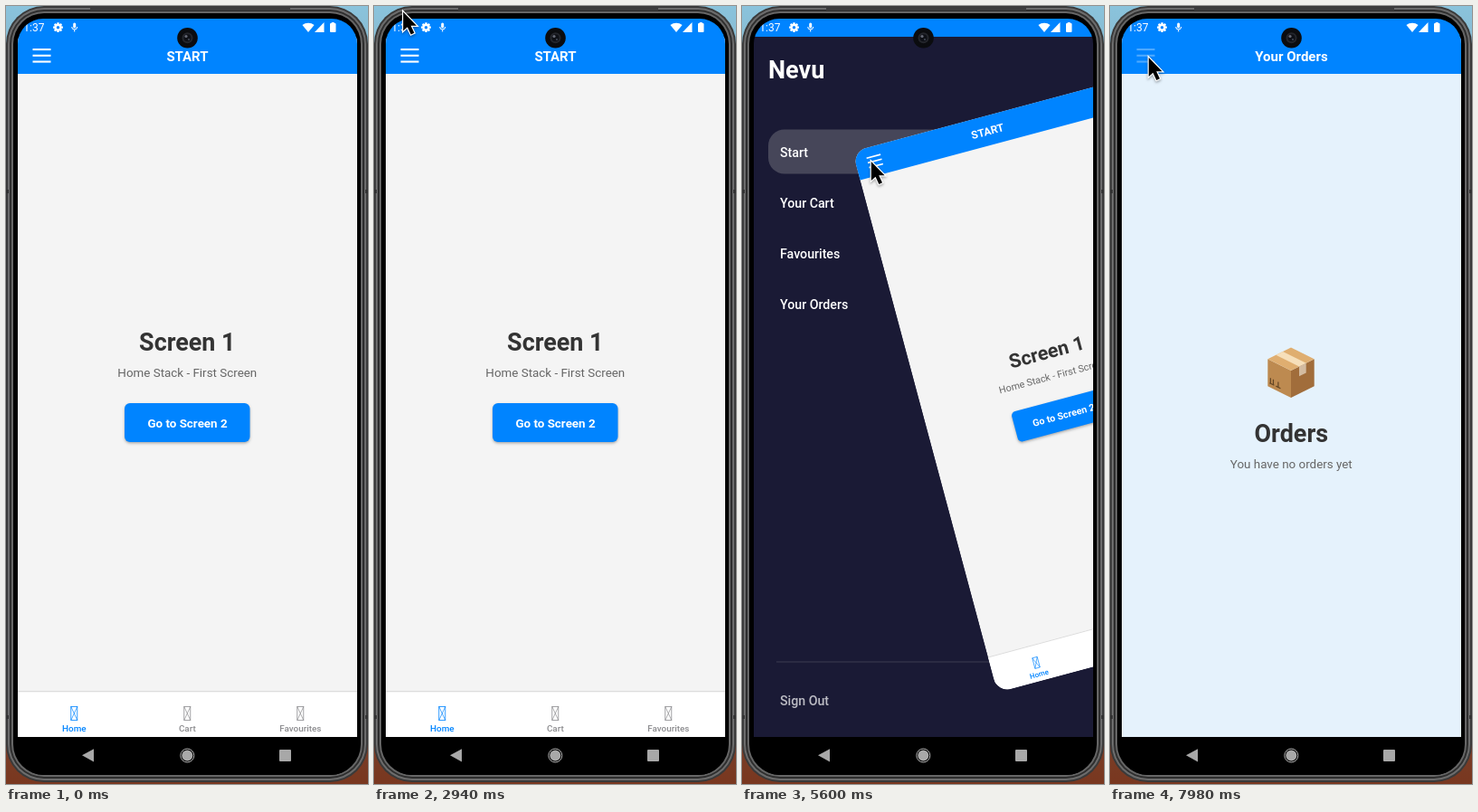
These frames come from a looping animation (400 by 860 pixels, 8 s). An HTML page with a canvas:

```html
<!DOCTYPE html>
<html lang="en">
<head>
<meta charset="utf-8">
<title>Drawer navigation</title>
<style>
html, body { margin: 0; width: 100%; height: 100%; overflow: hidden; background: #000; }
canvas { display: block; }
</style>
</head>
<body>
<canvas id="stage" width="400" height="860"></canvas>
<script>
const ctx = document.getElementById('stage').getContext('2d');
const LOOP = 8000, STEP = 70, TURN = Math.PI * 2;
const BLUE = '#0084ff', NAVY = '#1a1a35', INK = '#333', GREY = '#a8a8a8';
const LEFT = 13, TOP = 34, WIDTH = 375, HEIGHT = 774;
const CX = LEFT + WIDTH / 2, CY = TOP + HEIGHT / 2;
const MENU = ['Start', 'Your Cart', 'Favourites', 'Your Orders'];
const TABS = ['Home', 'Cart', 'Favourites'];

// the pointer circles once, then eases between a few stops: time, x, y
const CIRCLE = { start: 1260, period: 653, x: 193, y: 592, rx: 88, ry: 136 };
const STOPS = [
  [420, 184, 846], [980, 268, 400], [1260, 193, 456], [1913, 193, 456], [2310, 179, 465],
  [2870, 32, 4], [3290, 22, 30], [3430, 4, 44], [3780, 40, 58], [4480, 42, 60],
  [4900, 162, 192], [5250, 142, 171], [5600, 142, 171], [5670, 332, 21], [5810, 324, 29],
  [6440, 67, 328], [7000, 69, 329], [7420, 50, 88], [7840, 42, 56]
];

function rounded(x, y, w, h, r, fill) {
  ctx.beginPath();
  ctx.roundRect(x, y, w, h, r);
  if (fill) { ctx.fillStyle = fill; ctx.fill(); }
}

function rect(x, y, w, h, fill) {
  ctx.fillStyle = fill;
  ctx.fillRect(x, y, w, h);
}

function disc(x, y, r, fill) {
  ctx.beginPath();
  ctx.arc(x, y, r, 0, TURN);
  ctx.fillStyle = fill;
  ctx.fill();
}

function ring(x, y, r, color, end = TURN) {
  ctx.beginPath();
  ctx.arc(x, y, r, 0, end);
  ctx.strokeStyle = color;
  ctx.lineWidth = 1;
  ctx.stroke();
}

function poly(fill, ...points) {
  ctx.beginPath();
  points.forEach(([x, y]) => ctx.lineTo(x, y));
  ctx.fillStyle = fill;
  ctx.fill();
}

function line(color, width, x1, y1, x2, y2) {
  ctx.strokeStyle = color;
  ctx.lineWidth = width;
  ctx.beginPath();
  ctx.moveTo(x1, y1);
  ctx.lineTo(x2, y2);
  ctx.stroke();
}

// y is the middle of the capital letters
function text(str, x, y, size, weight, color, align = 'center') {
  ctx.font = `${weight} ${size}px Roboto, sans-serif`;
  ctx.textAlign = align;
  ctx.fillStyle = color;
  ctx.fillText(str, x, y + size * 0.355);
}

function shadow(blur, alpha) {
  ctx.shadowColor = `rgba(0,0,0,${alpha})`;
  ctx.shadowBlur = blur;
  ctx.shadowOffsetY = 1.5;
}

function ease(t, start, duration) {
  const k = Math.min(1, Math.max(0, (t - start) / duration));
  return k < 0.5 ? 2 * k * k : 1 - 2 * (1 - k) ** 2;
}

function drawFrame() {
  const wall = ctx.createLinearGradient(0, 0, 0, 860);
  wall.addColorStop(0, '#8ac3dc');
  wall.addColorStop(0.5, '#777');
  wall.addColorStop(1, '#79371f');
  rect(0, 0, 400, 860, wall);
  ['#3a3a3a', '#6c6c6c', '#2e2e2e', '#666', '#000'].forEach((color, i) => {
    const inset = i * 2;
    rounded(inset, inset, 400 - inset * 2, 858 - inset * 2, 42 - inset, color);
  });
  rect(93, 1, 221, 4, '#3c3c3c');
  for (const x of [0, 397]) for (const y of [203, 784]) rect(x, y, 3, 4, '#333');
}

function drawStatus() {
  rect(LEFT, 14, WIDTH, 20, BLUE);
  text('1:37', 42.5, 24, 12, 400, '#fff', 'right');

  for (let i = 0; i < 8; i++) {
    const a = i * TURN / 8;
    line('#fff', 2.3, 57.5, 23.7, 57.5 + 5.4 * Math.cos(a), 23.7 + 5.4 * Math.sin(a));
  }
  disc(57.5, 23.7, 4.1, '#fff');
  disc(57.5, 23.7, 1.7, BLUE);

  rounded(74.2, 18.5, 3, 6, 1.5, '#fff');
  ring(75.7, 23, 3, '#fff', TURN / 2);
  line('#fff', 1, 75.7, 26, 75.7, 28.5);

  ctx.beginPath();
  ctx.moveTo(334, 29);
  ctx.arc(334, 29, 10.3, TURN * 0.64, TURN * 0.86);
  ctx.fillStyle = '#fff';
  ctx.fill();
  poly('#fff', [341, 29], [351.5, 29], [351.5, 18]);
  rounded(358, 19, 6.5, 10, 1, '#fff');
  rect(359.7, 18, 3, 2, '#fff');
}

function drawMenu(active) {
  rect(LEFT, TOP, WIDTH, HEIGHT, NAVY);
  text('Nevu', 29, 70, 27, 700, '#fff', 'left');
  rounded(29, 136.5 + active * 56, 216, 49, 18, '#464659');
  MENU.forEach((label, i) => text(label, 42, 161.7 + i * 56, 14.2, 500, '#fff', 'left'));
  rect(38, 724.5, 262, 1, '#3c3c53');
  text('Sign Out', 42, 768, 14.2, 500, '#bcbcc4', 'left');
}

function drawPage(background, title, pressed) {
  rect(LEFT, TOP, WIDTH, HEIGHT, background);
  rect(LEFT, TOP, WIDTH, 41, BLUE);
  text(title, CX, 55.3, 15, 700, '#fff');
  const bars = pressed ? 'rgba(255,255,255,.3)' : '#fff';
  for (let i = 0; i < 3; i++) rect(29.5, 47 + i * 6.75, 20, 2.1, bars);
}

function drawTab(label, i) {
  const x = 75.3 + i * 125, color = i ? '#8c8c8f' : BLUE;
  ctx.strokeStyle = color;
  ctx.lineWidth = 0.8;
  ctx.strokeRect(x - 3.5, 774.5, 7, 15);
  for (const side of [-3.5, 3.5]) line(color, 0.7, x - side, 774.5, x + side, 789.5);
  text(label, x, 798.3, 9.9, 500, color);
}

function drawStart(pressed) {
  drawPage('#f4f4f4', 'START', pressed);
  text('Screen 1', 200.3, 371, 26.9, 700, INK);
  text('Home Stack - First Screen', 200.3, 405.3, 13.4, 400, '#666');
  ctx.save();
  shadow(3, 0.3);
  rounded(131, 439, 138.5, 43, 6, BLUE);
  ctx.restore();
  text('Go to Screen 2', 200.5, 461.3, 13.4, 600, '#fff');
  rect(LEFT, 757, WIDTH, 51, '#fff');
  rect(LEFT, 757, WIDTH, 1.3, '#dcdcdc');
  TABS.forEach(drawTab);
}

// a point of the parcel, with u and v across its lid and h downwards
const iso = (u, v, h = 0) => [200 + (u - v) * 25.7, 377.5 + (u + v) * 12.7 + h * 30];

function drawParcel() {
  poly('#bd8a50', iso(0, 1), iso(1, 1), iso(1, 1, 1), iso(0, 1, 1));
  poly('#a16d3b', iso(1, 0), iso(1, 1), iso(1, 1, 1), iso(1, 0, 1));
  poly('#dfae70', iso(0, 0), iso(1, 0), iso(1, 1), iso(0, 1));
  poly('#f6dfba', iso(0, 0.35), iso(1, 0.35), iso(1, 0.65), iso(0, 0.65));
  poly('#d3bba0', iso(1, 0.35), iso(1, 0.65), iso(1, 0.65, 0.36), iso(1, 0.35, 0.36));
  for (const u of [0.12, 0.24, 0.45]) line('#624524', 1.2, ...iso(u, 1, 0.65), ...iso(u, 1, 0.85));
  for (const u of [0.08, 0.35]) line('#624524', 1.2, ...iso(u, 1, 0.85), ...iso(u + 0.2, 1, 0.85));
}

function drawOrders(pressed) {
  drawPage('#e5f2fc', 'Your Orders', pressed);
  drawParcel();
  text('Orders', 200.3, 472, 26.9, 700, INK);
  text('You have no orders yet', 200.3, 506.7, 13.4, 400, '#666');
}

function drawScene(open, orders, pressed) {
  const size = 1 - 0.2 * open;
  ctx.save();
  ctx.translate(CX + 146.5 * open, CY);
  ctx.rotate(-open * TURN / 24);
  ctx.scale(size, size);
  ctx.translate(-CX, -CY);
  rounded(LEFT, TOP, WIDTH, HEIGHT, 20 * open);
  ctx.clip();
  (orders ? drawOrders : drawStart)(pressed);
  ctx.restore();
}

function drawNavigation() {
  rect(LEFT, 808, WIDTH, 42, '#000');
  poly(GREY, [84, 828.3], [97, 821.3], [97, 835.5]);
  disc(200.3, 828.5, 6, GREY);
  ring(200.3, 828.5, 7.5, '#b4b4b4');
  rounded(302, 822, 13, 13, 1, GREY);
}

function drawCamera() {
  disc(200.5, 35.3, 11.3, '#0b0c0f');
  disc(200.5, 35.3, 6, '#24262c');
  disc(200.5, 35.3, 4, '#0e1016');
  disc(199, 33.5, 1.6, '#676b77');
  disc(202, 37, 1, '#454a58');
}

function pointerAt(t) {
  const turn = (t - CIRCLE.start) / CIRCLE.period;
  if (turn > 0 && turn < 1) {
    const a = turn * TURN;
    return [CIRCLE.x - CIRCLE.rx * Math.sin(a), CIRCLE.y - CIRCLE.ry * Math.cos(a)];
  }
  const next = STOPS.findIndex(stop => stop[0] > t);
  if (next < 0) return STOPS.at(-1).slice(1);
  const [t0, x0, y0] = STOPS[next - 1], [t1, x1, y1] = STOPS[next];
  const k = ease(t, t0, t1 - t0);
  return [x0 + (x1 - x0) * k, y0 + (y1 - y0) * k];
}

function drawPointer(t) {
  if (t < STOPS[0][0]) return;
  const arrow = new Path2D('M.8 1V22L5.5 17.7L9.4 26L13 24.3L9.2 16.3H15.6Z');
  ctx.save();
  ctx.translate(...pointerAt(t));
  shadow(3, 0.35);
  ctx.strokeStyle = '#fff';
  ctx.lineWidth = 2.4;
  ctx.stroke(arrow);
  ctx.shadowColor = 'transparent';
  ctx.fillStyle = '#000';
  ctx.fill(arrow);
  ctx.restore();
}

function draw(t) {
  const open = ease(t, 4184, 280) - ease(t, 6762, 280);
  const orders = t >= 6720;
  const pressed = (t >= 4130 && t < 4340) || t >= 7900;

  drawFrame();
  ctx.save();
  rounded(LEFT, 14, WIDTH, 836, 28);
  ctx.clip();
  drawStatus();
  ctx.save();
  ctx.beginPath();
  ctx.rect(LEFT, TOP, WIDTH, HEIGHT);
  ctx.clip();
  drawMenu(orders ? 3 : 0);
  drawScene(open, orders, pressed);
  ctx.restore();
  drawNavigation();
  ctx.restore();
  drawCamera();
  drawPointer(t);
}

function tick() {
  const t = performance.now() % LOOP;
  draw(Math.floor(t / STEP) * STEP);
  requestAnimationFrame(tick);
}
tick();
</script>
</body>
</html>
```
